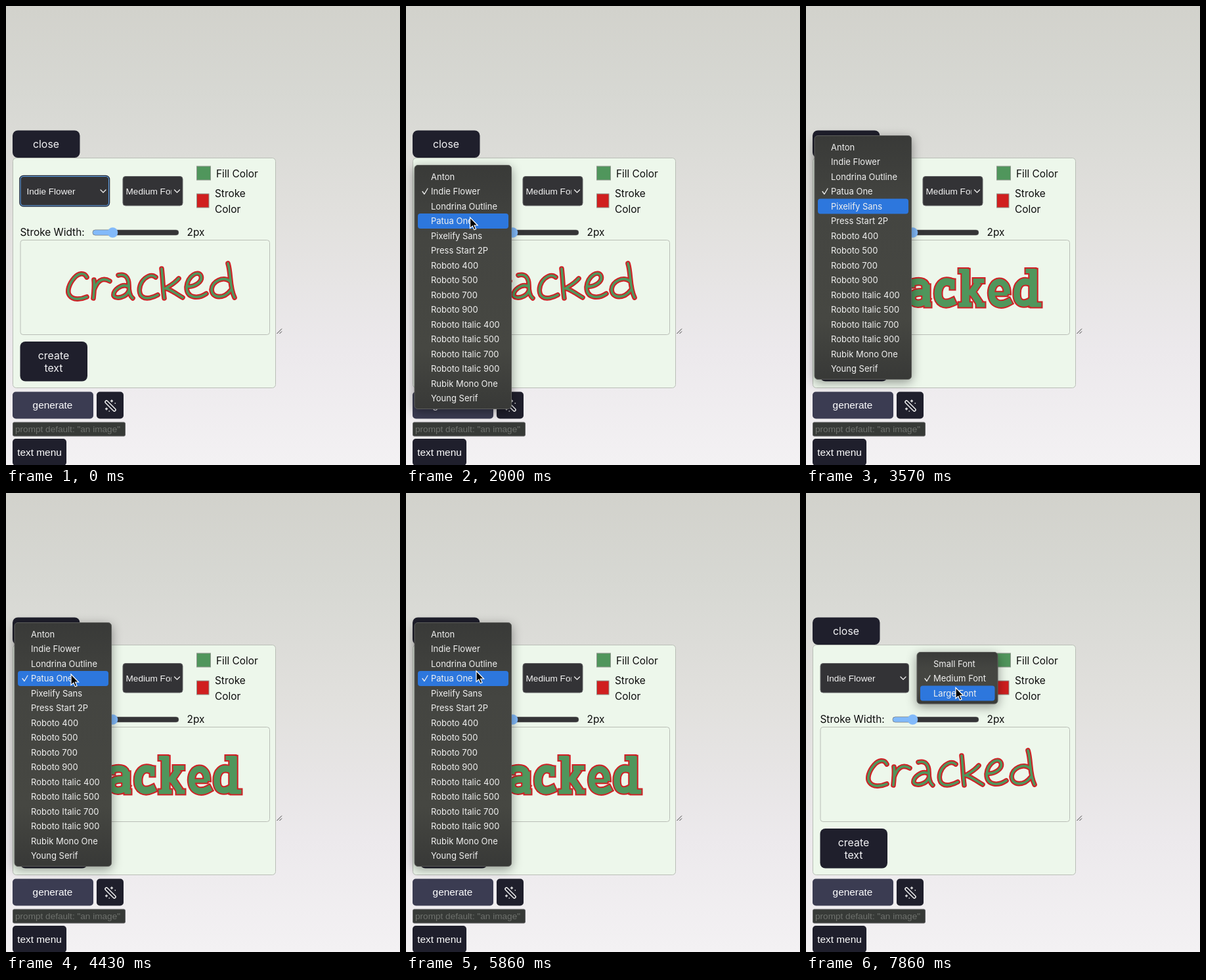
Animation, 600 px wide and 699 px high, one loop 8 s. Source, as an HTML page:

```html
<!DOCTYPE html>
<html lang="en">
<head>
<meta charset="utf-8">
<title>Text menu</title>
<style>
  html, body { margin: 0; height: 100%; overflow: hidden; }
  #stage { display: block; width: 100vw; height: 100vh; }
  text { font: 15.4px Inter, sans-serif; fill: #0c0c0c; }
  .btn text { font-size: 15.9px; fill: #f2f2f4; text-anchor: middle; }
  .btn .arial { font: 15.4px "Liberation Sans", Arial, sans-serif; fill: #fff; }
  .btn rect { fill: #1f1f2c; }
  .field text { font: 13.6px "Liberation Sans", Arial, sans-serif; fill: #f4f4f4; }
  .field rect { fill: #333336; stroke: #626264; }
  .line { fill: none; stroke: #f0f0f0; stroke-width: 1.3; stroke-linecap: round; stroke-linejoin: round; }
  .menu text { font-size: 13px; fill: #f1f1f0; }
  .menu .body { fill: url(#dark); stroke: #5c5d5a; filter: drop-shadow(0 4px 8px #0006); }
  .menu .hover { fill: #2d77dd; }
  .word path { fill: none; }
</style>
</head>
<body>
<svg id="stage" viewBox="0 0 600 699" preserveAspectRatio="none">
  <defs>
    <linearGradient id="sky" x2="0" y2="1">
      <stop offset="0" stop-color="#d2d2cc"/>
      <stop offset=".2" stop-color="#d7d8d3"/>
      <stop offset=".45" stop-color="#e1e0dd"/>
      <stop offset=".75" stop-color="#ece9ec"/>
      <stop offset="1" stop-color="#f3f1f3"/>
    </linearGradient>
    <linearGradient id="dark" x2="0" y2="1">
      <stop offset="0" stop-color="#393a38"/>
      <stop offset=".3" stop-color="#444541"/>
      <stop offset=".75" stop-color="#464742"/>
      <stop offset="1" stop-color="#383937"/>
    </linearGradient>
  </defs>
  <rect width="600" height="699" fill="url(#sky)"/>

  <rect x="10.5" y="231.5" width="400" height="350" rx="5" fill="#edf7eb" stroke="#b9beb6"/>
  <rect x="22" y="356.5" width="379.5" height="144" rx="4" fill="none" stroke="#b9beb6"/>
  <path d="M412.500 499l7.500-7.500M416.500 499l3.500-3.500" fill="none" stroke="#444"/>

  <g class="btn">
    <rect x="10" y="189.500" width="102.500" height="41.500" rx="8"/>
    <text x="61" y="216">close</text>
    <rect x="21.500" y="511" width="102.500" height="60.500" rx="8"/>
    <text x="72.500" y="537.500">create</text>
    <text x="72.500" y="557">text</text>
    <rect x="10" y="587.500" width="123" height="41" rx="5" style="fill:#3b3c52"/>
    <text class="arial" x="71" y="613">generate</text>
    <rect x="138" y="587.500" width="41" height="41" rx="5"/>
    <rect x="10" y="659" width="82" height="41" rx="5"/>
    <text class="arial" x="51" y="685">text menu</text>
  </g>
  <path class="line" d="M153 603L165 615" style="stroke-width:5.500"/>
  <path class="line" d="M153 603L165 615" style="stroke:#1f1f2c;stroke-width:2.500"/>
  <path class="line" d="M161 600v3M159.500 601.500h3M166 605h.5M153 612v3M151.500 613.500h3M157 617h.5"/>

  <g class="field">
    <rect id="ring" x="21.500" y="259" width="135.500" height="45.500" rx="5" style="stroke:#14182b;stroke-width:2.500"/>
    <rect id="fontBox" x="22" y="259.500" width="134.500" height="44.500" rx="4"/>
    <text id="fontName" x="31.500" y="286.500"></text>
    <path class="line" d="M144 280l4 4 4-4"/>
    <rect x="178" y="259.500" width="91" height="44.500" rx="4"/>
    <svg x="182.500" y="260" width="69.500" height="44"><text y="26.500">Medium Font</text></svg>
    <path class="line" d="M256.500 280l4 4 4-4"/>
    <rect x="10.500" y="634" width="171" height="21" rx="2" style="fill:#373a37"/>
    <text x="14" y="649" style="fill:#6e716d">prompt default: "an image"</text>
  </g>

  <rect x="290.500" y="244" width="21" height="21" fill="#50965c" stroke="#8f958d"/>
  <rect x="290.500" y="286" width="18.500" height="21" fill="#d01f1f" stroke="#8f958d"/>
  <text x="320" y="260.500">Fill Color</text>
  <text x="318" y="290.500">Stroke</text>
  <text x="318" y="315">Color</text>
  <text x="21.500" y="349.500">Stroke Width:</text>
  <text x="275.500" y="349.500">2px</text>
  <rect x="132" y="341" width="131" height="8" rx="4" fill="#343436" stroke="#777" stroke-width=".5"/>
  <rect x="132" y="341" width="34" height="8" rx="4" fill="#82bafa" stroke="#777" stroke-width=".5"/>
  <circle cx="162.500" cy="345" r="7.800" fill="#82bafa"/>

  <g id="script" class="word" stroke-linecap="round" stroke-linejoin="round"></g>
  <g id="slab" class="word" stroke-linecap="square"></g>
  <g id="menu" class="menu"></g>
  <path id="cursor" d="M0 0V16.500L3.800 13 6.300 18.800 9 17.600 6.500 12H11.600Z" fill="#000" stroke="#fff" stroke-width="1.200"/>
</svg>
<script>
const $ = id => document.getElementById(id);
const FONTS = ["Anton", "Indie Flower", "Londrina Outline", "Patua One", "Pixelify Sans", "Press Start 2P",
  ...["", "Italic "].flatMap(s => [400, 500, 700, 900].map(w => `Roboto ${s}${w}`)),
  "Rubik Mono One", "Young Serif"];
const SIZES = ["Small Font", "Medium Font", "Large Font"];
const INDIE = 1, PATUA = 3, ROW = 22.5;

// Strokes of each word as [width, path]
const scriptWord = [[3.6, `M123 413C119 405 110 407 104 414C96 423 92 435 97 441C102 448 114 447 123 443
  M134 417C135 426 134 436 133 445M134 433C138 420 146 412 158 419
  M171 410C181 407 187 413 187 425C187 436 189 442 193 445M186 427C176 422 163 433 164 441C167 447 183 444 187 434
  M228 413C221 407 212 413 207 420C201 430 203 440 208 443C214 447 224 444 231 440
  M237 400C239 416 239 432 241 445M263 415C258 421 250 426 243 430C252 432 260 439 269 444
  M277 427C287 428 300 420 297 411C293 402 277 410 275 428C275 446 293 446 305 438
  M338 392C343 408 340 428 348 444M341 419C331 411 314 419 313 432C314 446 332 446 342 433`]];
const slabC = x => [
  [11, `M${x + 26} 420.500C${x + 15} 417 ${x + 8} 426 ${x + 8} 438C${x + 8} 452 ${x + 18} 456 ${x + 29} 451`],
  [7, `M${x + 30} 420V428`]];
const slabWord = [...slabC(84), ...slabC(193),
  [11.5, "M133 421V452M183 450V430M243 406.500V452M346 406.500V452"],
  [7, `M127 418.500H133M127 455H144M149 419V426M184 455H187M162 421V425
    M236 403.500H243M236 455H249M258 418.500H268M263 455H269
    M338 403.500H346M346 455H355`],
  [5.5, "M288 438.500H304"],
  [9.5, `M138 429C140 421 144 420 147 420M164 420.500C175 418 183 420 183 430
    M181 436.500C166 434 160 440 161 446C163 456 177 455 183 447
    M252 436.500L260 425M254 437L262 449
    M306 434C305 415.500 283 415 282.500 437C283 455 297 457 308 451
    M342 421.500C328 415.500 321 425 321 438C321 454 332 457 344 448`]];

const layer = (word, color, extra) => word.map(([w, d]) =>
  `<path d="${d}" stroke="${color}" stroke-width="${w + extra}"/>`).join("");
const outlined = word => layer(word, "#d01f24", 4) + layer(word, "#50965c", 0);
$("script").innerHTML = outlined(scriptWord);
$("slab").innerHTML = outlined(slabWord);

function menu(x, y, w, items, checked, hover, alpha = 1) {
  const mid = i => y + 17.5 + ROW * i;
  const bar = hover < 0 ? "" :
    `<rect class="hover" x="${x + 5}" y="${mid(hover) - 11.5}" width="${w - 9.5}" height="23" rx="4"/>`;
  return `<g opacity="${alpha}">
    <rect class="body" x="${x}" y="${y}" width="${w}" height="${items.length * ROW + 11}" rx="5"/>${bar}
    <path class="line" d="M${x + 12} ${mid(checked)}l3 4 5-8.500"/>
    ${items.map((s, i) => `<text x="${x + 25}" y="${mid(i) + 4.7}">${s}</text>`).join("")}</g>`;
}
const fontMenu = (checked, hover, alpha) =>
  menu(13, 310 - ROW * (checked + 2), 147.5, FONTS, checked, hover, alpha);

// Cursor stops: [step, x, y]
const PATH = [[0, 88, 280], [4, 90, 281], [12, 97.5, 322], [16, 97.5, 322], [21, 99, 278], [23, 99, 278],
  [25, 99, 300], [28, 100, 300], [31, 99, 276], [37, 99, 276], [41, 107, 271], [44, 107, 272],
  [48, 182, 279], [51, 190, 281], [55, 228, 296.5]];
function cursorAt(k) {
  const i = Math.max(1, PATH.findIndex(p => p[0] >= k));
  const [k0, x0, y0] = PATH[i - 1], [k1, x1, y1] = PATH[i];
  const f = (k - k0) / (k1 - k0);
  return [x0 + (x1 - x0) * f, y0 + (y1 - y0) * f];
}

function menuAt(k) {
  const within = (a, b) => k >= a && k <= b;
  const fade = 0.28;
  if (within(4, 15)) return fontMenu(INDIE, k < 7 ? 1 : k < 11 ? 2 : k < 15 ? 3 : -1);
  if (k === 16) return fontMenu(INDIE, 3, fade);
  if (within(22, 34)) return fontMenu(PATUA, within(24, 29) ? 4 : 3);
  if (k === 35) return fontMenu(PATUA, 3, fade);
  if (within(39, 44)) return fontMenu(PATUA, 3);
  if (k === 45) return fontMenu(PATUA, 3, fade);
  if (k >= 51) return menu(169, 242.5, 123, SIZES, 1, k < 54 ? 1 : 2);
  return "";
}

function draw(k) {
  const slab = k >= 16 && k < 50, focused = k < 4;
  $("slab").style.display = slab ? "" : "none";
  $("script").style.display = slab ? "none" : "";
  $("fontName").textContent = FONTS[slab ? PATUA : INDIE];
  $("ring").style.display = focused ? "" : "none";
  $("fontBox").style.stroke = focused ? "#6cb0f5" : "";
  $("menu").innerHTML = menuAt(k);
  $("cursor").style.display = k < 2 || (k >= 24 && k <= 26) ? "none" : "";
  $("cursor").setAttribute("transform", `translate(${cursorAt(k)})`);
}

// Seven steps a second
let last = -1;
function tick(now) {
  const k = Math.floor(((now + 5) % 8000) * 0.007);
  if (k !== last) draw(last = k);
  requestAnimationFrame(tick);
}
draw(0);
requestAnimationFrame(tick);
</script>
</body>
</html>
```
